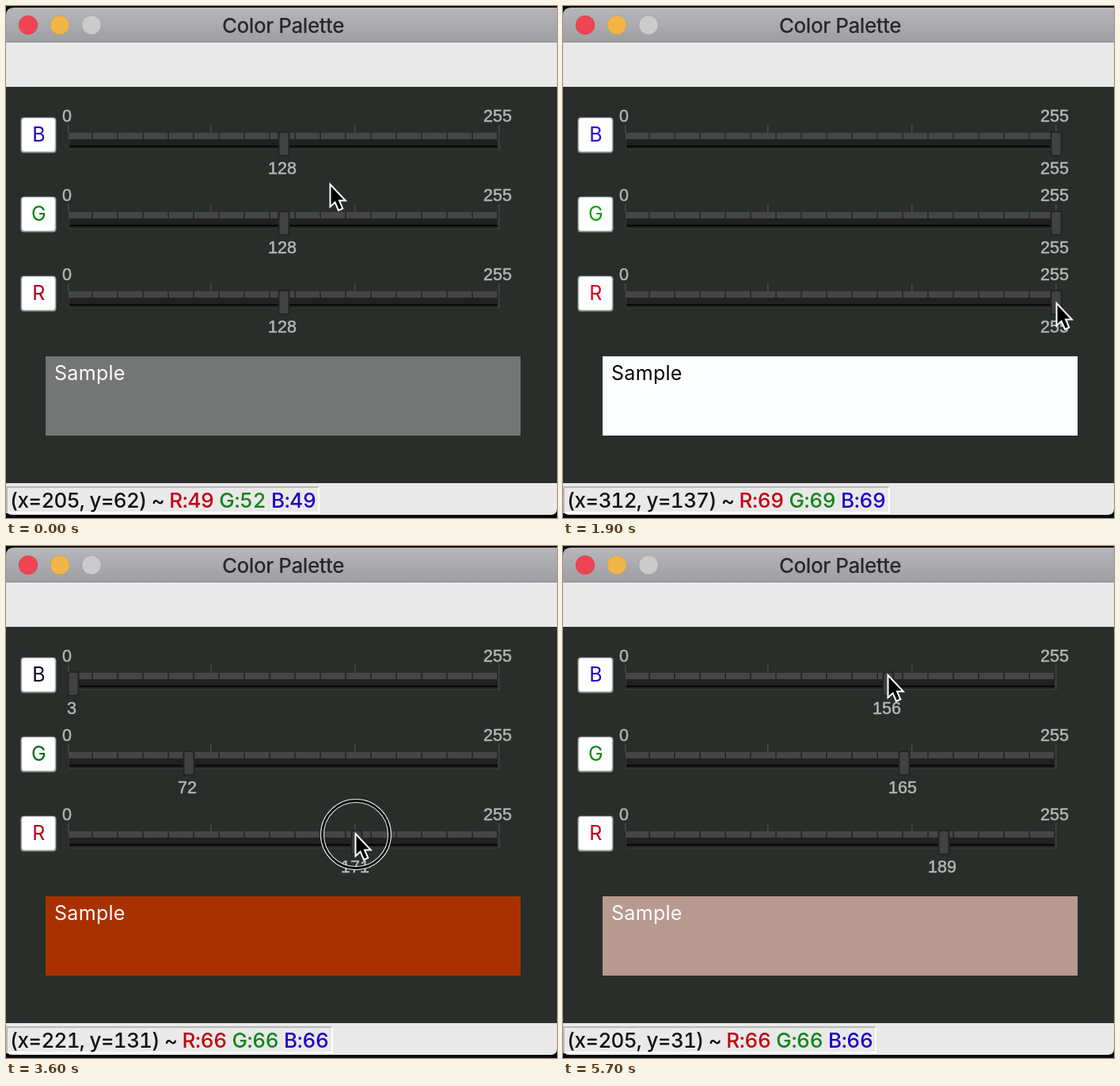
Recreate the animation shown at these times as an HTML page. Size 696 by 646 pixels, loop 5800 ms.

```html
<!DOCTYPE html>
<html lang="en">
<head>
<meta charset="utf-8">
<title>Color Palette</title>
<style>
  html, body { margin: 0; width: 100%; height: 100%; overflow: hidden; background: #080b0d; }
  svg { display: block; width: 696px; height: 646px; }
  text { font: 500 26px Inter, Roboto, sans-serif; font-variant-numeric: tabular-nums; white-space: pre; }
  .scale { font: 21.5px "Liberation Sans", Arial, sans-serif; fill: #b4b6b4; stroke: #b4b6b4;
    stroke-width: .5; text-anchor: middle; }
  .plain { font-size: 25px; font-weight: 400; letter-spacing: .3px; }
</style>
</head>
<body>
<svg id="stage" viewBox="0 0 696 646">
  <defs>
    <linearGradient id="bar" x2="0" y2="1">
      <stop stop-color="#b7b7ba"/><stop offset="1" stop-color="#9d9ea3"/>
    </linearGradient>
  </defs>
</svg>
<script>
const LOOP = 5800, STEP = 100, HOLD = 200;
const stage = document.getElementById('stage');

function add(tag, attrs, parent = stage, text) {
  const el = document.createElementNS('http://www.w3.org/2000/svg', tag);
  set(el, attrs);
  if (text !== undefined) el.textContent = text;
  return parent.appendChild(el);
}
function set(el, attrs) {
  for (const key in attrs) el.setAttribute(key, attrs[key]);
}
const rect = (x, y, width, height, fill, extra) => add('rect', { x, y, width, height, fill, ...extra });
const thumbX = value => 79 + 2 * Math.floor(value * 272 / 255);

const channels = [
  { name: 'B', hue: 249, light: 46 },
  { name: 'G', hue: 123, light: 33 },
  { name: 'R', hue: 354, light: 42 }
];

// Presses: time, channel, new value, pointer offset from the thumb
const presses = [
  [400, 'B', 252], [800, 'G', 244, 3], [1100, 'G', 255], [1400, 'B', 255], [1700, 'R', 255],
  [2100, 'R', 0], [2300, 'G', 0, -4], [2900, 'B', 3], [3200, 'G', 72], [3500, 'R', 171, -2],
  [4000, 'B', 202], [4400, 'G', 165], [4700, 'R', 161], [5000, 'R', 189], [5500, 'B', 156, -1]
].map(([time, name, value, grab = 0]) => ({
  time, name, value,
  x: thumbX(value) + grab,
  y: 100 * channels.findIndex(c => c.name === name) + (time < 3000 ? 174 : 162)
}));
const stops = [{ time: -HOLD, x: 409, y: 224 }, ...presses];

const lastOf = (list, t) => list.filter(item => item.time <= t).pop();
const valueAt = (name, t) => lastOf(presses.filter(p => p.name === name), t)?.value ?? 128;

function pointerAt(t) {
  const from = lastOf(stops, t), to = stops[stops.indexOf(from) + 1] || from;
  const pressed = t < from.time + HOLD;
  const u = pressed || to === from ? 0 : (t - from.time - HOLD) / (to.time - from.time - HOLD);
  const ease = u * u * (3 - 2 * u);
  return { x: from.x + (to.x - from.x) * ease, y: from.y + (to.y - from.y) * ease, pressed };
}

// Screen colour profile: tone curve, then a slight gain in saturation
function displayed(r, g, b) {
  const [R, G, B] = [r, g, b].map(v => (v / 255) ** 2.49);
  return [1.11 * R - .135 * G + .015 * B, 1.05 * G - .05 * R, B + .04 * (G - R)]
    .map(v => Math.round(255 * Math.min(1, Math.max(0, v)) ** (1 / 2.2)));
}

// Window
add('path', { d: 'M0 46V12Q0 2 10 2H696V46Z', fill: 'url(#bar)' });
rect(0, 45, 696, 1, '#88898d');
['#ee4453', '#f2b548', '#cbcbcb'].forEach((fill, i) =>
  add('circle', { cx: 28 + 40 * i, cy: 24, r: 12, fill, stroke: '#000', 'stroke-opacity': .08 }));
add('text', { x: 350, y: 34, 'text-anchor': 'middle', 'letter-spacing': -.45, fill: '#28282a' }, stage, 'Color Palette');
rect(0, 46, 696, 56, '#e9e9e9');
rect(0, 102, 696, 500, '#2a2e2b');
add('path', { d: 'M0 602H696V634Q696 642 688 642H8Q0 642 0 634Z', fill: '#e9e9e9' });

function buildSlider({ name }, row) {
  const y = 100 * (row + 1);
  rect(18.5, y + 40.5, 45, 45, '#8d908e', { rx: 4 });
  rect(20, y + 41.5, 42, 42, '#fff', { rx: 3, stroke: '#d8d8d8' });
  const label = add('text', { class: 'plain', x: 41.5, y: y + 71, 'text-anchor': 'middle' }, stage, name);
  rect(79, y + 60, 544, 8, '#454645');
  for (let x = 109; x < 623; x += 32) rect(x - 1, y + 60, 2, 8, '#2a2b2a');
  rect(79, y + 68, 545, 14, '#323432');
  rect(80, y + 68, 541, 12, '#222122');
  rect(80, y + 76, 541, 2, '#080808');
  for (const x of [79, 259, 441, 623]) rect(x - 1, y + 50, 1.5, 10, '#464946');
  rect(622, y + 60, 1.5, 22, '#3c3f3c');
  for (const [x, text] of [[77, 0], [621, 255]])
    add('text', { class: 'scale', x, y: y + 46 }, stage, text);
  const thumb = rect(0, y + 59, 13, 30, '#414241', { rx: 3, stroke: '#232423', 'stroke-width': 2 });
  const value = add('text', { class: 'scale', y: y + 112 });
  return { label, thumb, value };
}
const sliders = channels.map(buildSlider);

const sample = rect(50, 442, 600, 100);
const sampleText = add('text', { class: 'plain', x: 61, y: 472 }, stage, 'Sample');

// Status line
const sunken = add('path', { fill: 'none', stroke: '#b9b9b9', 'stroke-width': 2 });
const raised = add('path', { fill: 'none', stroke: '#fff', 'stroke-width': 2 });
const status = add('text', { x: 5, y: 633, 'letter-spacing': -.3 });
const position = add('tspan', { 'letter-spacing': -.7, fill: '#111' }, status);
const readouts = ['#c2000f', '#11851a', '#1e00c8'].map(fill => add('tspan', { fill }, status));

// Pointer
const pointer = add('g', {});
const ring = add('g', { fill: 'none' }, pointer);
add('circle', { cx: 1, cy: 2, r: 42.5, stroke: '#e8e8e8', 'stroke-width': 5 }, ring);
add('circle', { cx: 1, cy: 2, r: 42.5, stroke: '#000', 'stroke-width': 2.8 }, ring);
add('path', {
  d: 'M1.5 3.5V27L7 22L11.5 32.5L15 31L10.5 20.5H17.5Z',
  fill: '#000', stroke: '#fff', 'stroke-width': 4, 'paint-order': 'stroke'
}, pointer);

function draw(t) {
  const [b, g, r] = channels.map(({ name, hue, light }, i) => {
    const value = valueAt(name, t), { label, thumb, value: number } = sliders[i];
    set(label, { fill: `hsl(${hue} 95% ${light * (value / 255) ** .35}%)` });
    set(thumb, { x: thumbX(value) - 6.5 });
    set(number, { x: thumbX(value) - 2 });
    number.textContent = value;
    return value;
  });

  set(sample, { fill: `rgb(${displayed(r, g, b)})` });
  set(sampleText, { fill: Math.min(r, g, b) > 200 ? '#000' : '#fff' });

  const { x, y, pressed } = pointerAt(t);
  set(pointer, { transform: `translate(${x} ${y})` });
  set(ring, { visibility: pressed ? 'visible' : 'hidden' });

  const onSlider = y > 160 && Math.abs(y % 100 - 70) < 9;
  const shade = onSlider ? (t < 3000 ? 69 : 66) : 49;
  position.textContent = `(x=${Math.round(x / 2)}, y=${Math.round((y - 100) / 2)}) ~ `;
  readouts[0].textContent = `R:${shade} `;
  readouts[1].textContent = `G:${onSlider ? shade : shade + 3} `;
  readouts[2].textContent = `B:${shade}`;
  const right = Math.round(status.getComputedTextLength()) + 9;
  set(sunken, { d: `M1 640V607H${right}` });
  set(raised, { d: `M2 639H${right}V607` });
}

const start = performance.now();
function tick() {
  const t = (performance.now() - start) % LOOP;
  draw(Math.floor(t / STEP) * STEP);
  requestAnimationFrame(tick);
}
tick();
</script>
</body>
</html>
```
